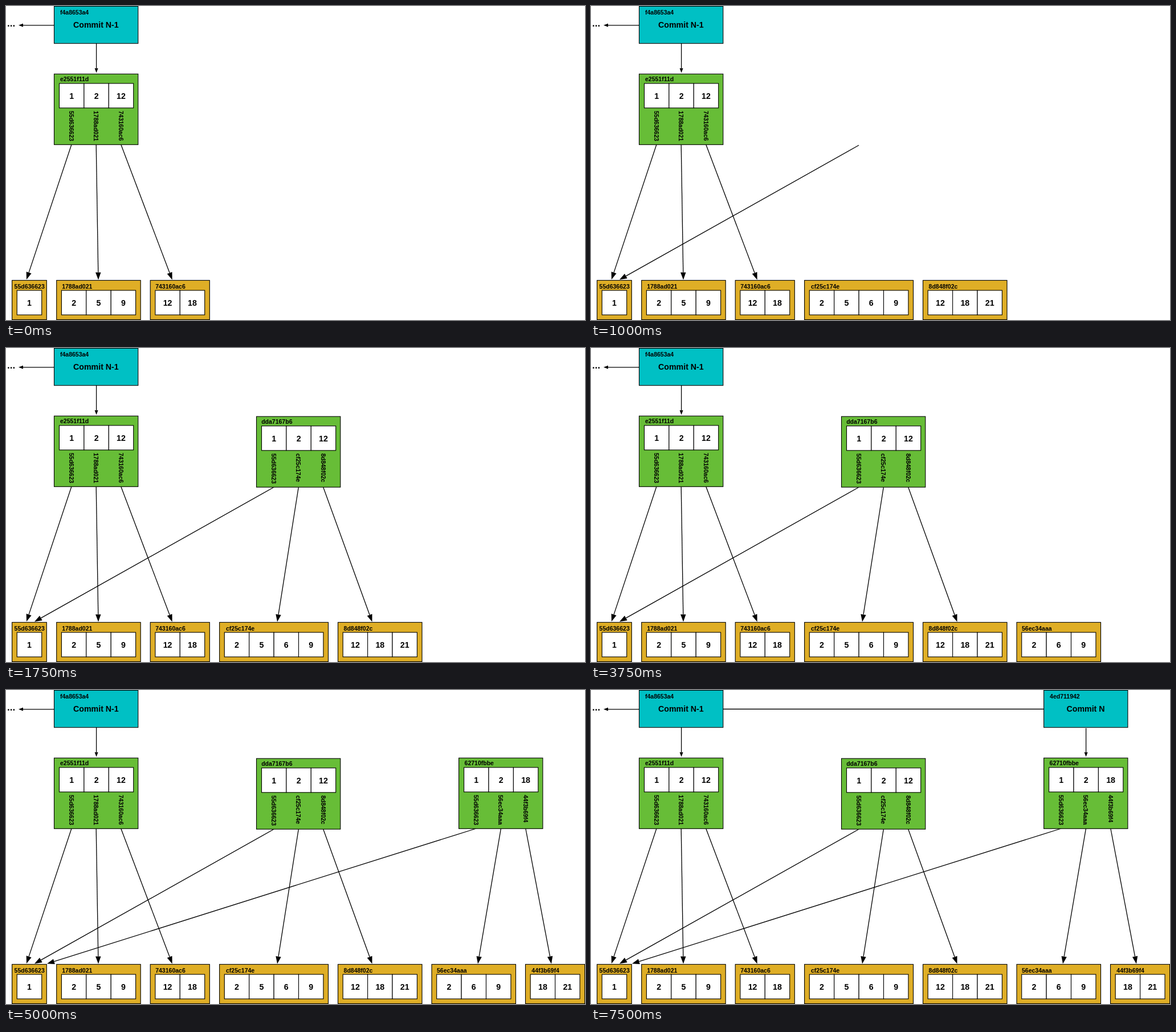
Write an HTML page that moves like this. It is 1016 by 551 pixels and loops after 8 s.

```html
<!DOCTYPE html>
<html lang="en">
<head>
<meta charset="utf-8">
<title>Commit tree</title>
<style>
  html, body { margin: 0; width: 100%; height: 100%; overflow: hidden; background: #fff; }
  svg { display: block; width: 1016px; height: 551px; }
  text { font-family: "Liberation Sans", Arial, Helvetica, sans-serif; font-weight: bold; }
  .box, .cell { stroke: #000; stroke-width: 1.1; }
  .cell { fill: #fff; }
  line { stroke: #000; stroke-width: 1.3; }
</style>
</head>
<body>
<svg id="stage" viewBox="0 0 1016 551"></svg>
<script>
const LOOP = 8000;
const CELL = 43.4;
const TEAL = '#00c0c4', GREEN = '#67bd37', GOLD = '#dfae26';
const stage = document.getElementById('stage');
const steps = [];

function add(parent, tag, attrs, label) {
  const el = document.createElementNS('http://www.w3.org/2000/svg', tag);
  for (const key in attrs) el.setAttribute(key, attrs[key]);
  if (label) el.textContent = label;
  parent.appendChild(el);
  return el;
}

// A group that becomes visible at the given time
function group(at) {
  const el = add(stage, 'g', {});
  steps.push({ el, at });
  return el;
}

function box(g, x, y, width, height, fill) {
  add(g, 'rect', { class: 'box', x, y, width, height, fill });
}

function hash(g, x, y, label) {
  add(g, 'text', { x, y, 'font-size': 10.5 }, label);
}

function title(g, x, y, label) {
  add(g, 'text', { x, y, 'font-size': 14.2, 'text-anchor': 'middle' }, label);
}

function cells(g, x, y, values) {
  values.forEach((value, i) => {
    const left = x + i * CELL;
    add(g, 'rect', { class: 'cell', x: left, y, width: CELL, height: 43 });
    title(g, left + CELL / 2, y + 26.9, value);
  });
}

function arrow(at, x1, y1, x2, y2, size = 13, half = 4.7) {
  const g = group(at);
  const len = Math.hypot(x2 - x1, y2 - y1);
  const ux = (x2 - x1) / len, uy = (y2 - y1) / len;
  const bx = x2 - ux * size, by = y2 - uy * size;
  add(g, 'line', { x1, y1, x2: bx, y2: by });
  const side = s => [bx - uy * half * s, by + ux * half * s].join();
  add(g, 'polygon', { points: [[x2, y2].join(), side(1), side(-1)].join(' ') });
}

const smallArrow = (at, ...ends) => arrow(at, ...ends, 8, 3);

function commit(at, x, id, name) {
  const g = group(at);
  box(g, x, 0.5, 147.3, 65.2, TEAL);
  hash(g, x + 10.5, 14.5, id);
  title(g, x + 73.4, 38.4, name);
}

function node(at, x, y, labelX, id, values, refs) {
  const g = group(at);
  box(g, x, y, 147.3, 124, GREEN);
  hash(g, labelX, y + 13, id);
  cells(g, x + 9, y + 16.6, values);
  refs.forEach((ref, i) => {
    const tx = x + 26.2 + i * CELL;
    add(g, 'text', { transform: `translate(${tx} ${y + 64.7}) rotate(90)`, 'font-size': 10.5 }, ref);
  });
}

function leaf(at, x, labelX, id, values) {
  const g = group(at);
  box(g, x, 481.4, values.length * CELL + 17.3, 69, GOLD);
  hash(g, labelX, 495.5, id);
  cells(g, x + 8.7, 499, values);
}

// Leaves: time, left, label left, hash, keys
[
  [0, 10.6, 14.6, '55d636623', [1]],
  [0, 88.7, 98.2, '1788ad021', [2, 5, 9]],
  [0, 253.2, 262.2, '743160ac6', [12, 18]],
  [500, 374.6, 386, 'cf25c174e', [2, 5, 6, 9]],
  [750, 582.5, 592.6, '8d848f02c', [12, 18, 21]],
  [3750, 747, 756, '56ec34aaa', [2, 6, 9]],
  [4000, 911.5, 922.3, '44f3b69f4', [18, 21]]
].forEach(row => leaf(...row));

// Links from nodes to leaves
[
  [0, 115, 243, 36, 480],
  [0, 158.2, 243, 162, 480.5],
  [0, 201.7, 243, 291.7, 480.5],
  [1000, 470, 244.3, 50, 480.3],
  [1250, 513.3, 244.3, 476, 480.5],
  [1500, 556.7, 244.3, 642.5, 480.5],
  [4250, 825.2, 243, 72, 480.3],
  [4500, 868.5, 243, 828, 480.5],
  [4750, 911.8, 243, 957, 480.5]
].forEach(row => arrow(...row));

node(0, 84.5, 119.3, 95, 'e2551f11d', [1, 2, 12], ['55d636623', '1788ad021', '743160ac6']);
node(1750, 439.5, 120.2, 448.2, 'dda7167b6', [1, 2, 12], ['55d636623', 'cf25c174e', '8d848f02c']);
node(5000, 794.6, 119.3, 804.6, '62710fbbe', [1, 2, 18], ['55d636623', '56ec34aaa', '44f3b69f4']);

smallArrow(0, 84.5, 33.8, 22, 33.8);
smallArrow(0, 158.6, 66, 158.6, 117.3);
smallArrow(7000, 868.6, 67, 868.6, 117.3);
add(group(7250), 'line', { x1: 232, y1: 33.5, x2: 794.5, y2: 33.5 });

commit(0, 84.5, 'f4a8653a4', 'Commit N-1');
commit(7500, 794.6, '4ed711942', 'Commit N');
add(group(0), 'text', { x: 2, y: 36.3, 'font-size': 17 }, '...');

function draw() {
  const t = performance.now() % LOOP;
  for (const { el, at } of steps) el.style.display = t >= at ? '' : 'none';
  requestAnimationFrame(draw);
}
draw();
</script>
</body>
</html>
```
